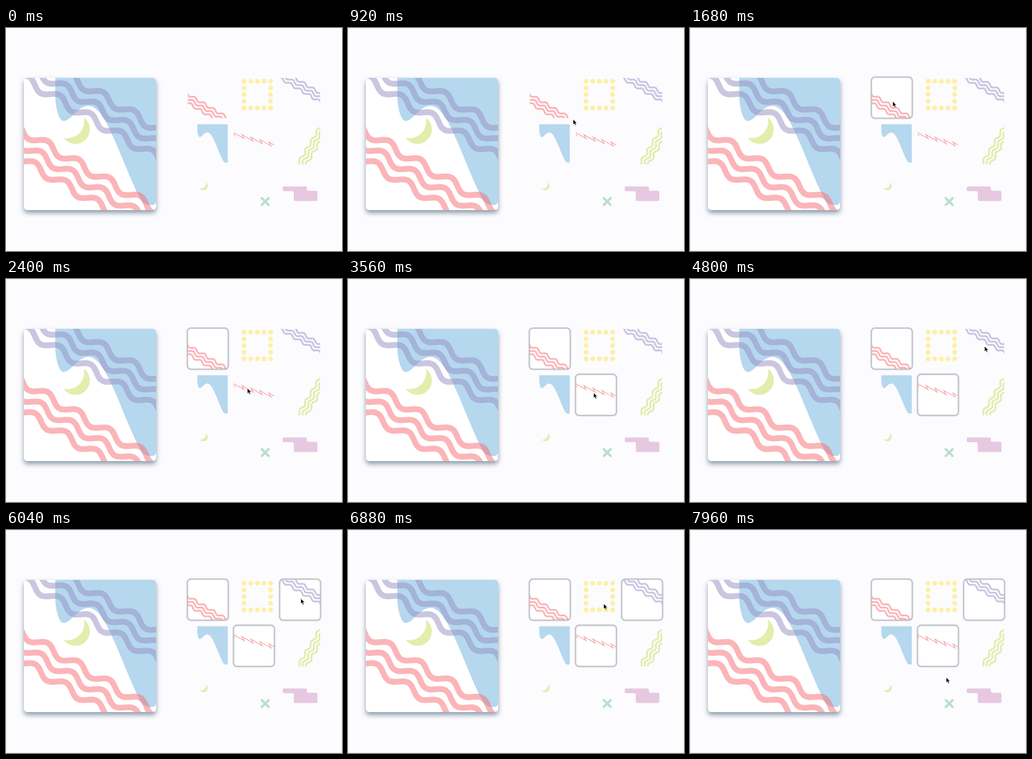
These frames come from a looping animation (600x398 px, 8000 ms). An HTML page:

```html
<!DOCTYPE html>
<html lang="en">
<head>
<meta charset="utf-8">
<title>Pattern picker</title>
<style>
html, body { margin: 0; width: 100%; height: 100%; overflow: hidden; background: #fcfbfe; }
svg { display: block; width: 100vw; height: 100vh; }
#card { filter: drop-shadow(0 5px 4.5px rgba(58, 92, 115, .6)); }
</style>
</head>
<body>
<svg id="stage" viewBox="0 0 600 398">
  <defs>
    <clipPath id="cardClip"><rect width="236" height="236" rx="6"/></clipPath>
    <clipPath id="tileClip"><rect width="236" height="236" rx="9"/></clipPath>
    <g id="coral" opacity=".5" fill="none" stroke="#f86d72" stroke-width="10.4"></g>
    <g id="violet" opacity=".5" fill="none" stroke="#958dc2" stroke-width="10.4"></g>
    <g id="lime" opacity=".5" fill="none" stroke="#c8de58" stroke-width="10.4"></g>
    <g id="dots" fill="#fdf0a3"></g>
    <path id="hill" fill="#b5d8ee" d="M56 0V31C56 51 62 77 71 77C84 77 96 50 115 50C134 50 148 79 165 118C181 156 196 194 208 216C213 225 220 227 227 227H228Q236 227 236 219V0Z"/>
    <polyline id="zigzag" fill="none" stroke="#f5a9ad" stroke-width="4.6"/>
    <path id="moon" fill="#e3edac" d="M107 71A25.8 25.8 0 1 1 71 107A30.1 30.1 0 0 0 107 71Z"/>
    <path id="cross" fill="none" stroke="#b9e0cb" stroke-width="14" stroke-linecap="round" d="M164 164L204 204M204 164L164 204"/>
    <path id="blocks" fill="#e6c9e0" d="M24 95H149Q158 95 158 104V113Q158 121 166 121H211Q220 121 220 130V172Q220 181 211 181H90Q81 181 81 172V132Q81 123 72 123H24Q16 123 16 115V103Q16 95 24 95Z"/>
  </defs>
  <rect width="600" height="398" fill="#fcfbfe"/>
  <rect id="edge" x=".5" y=".5" width="599" height="397" fill="none" stroke="#efeef1"/>
  <rect id="card" x="32" y="89" width="236" height="236" rx="6" fill="#fff"/>
  <g transform="translate(32 89)" clip-path="url(#cardClip)">
    <use href="#hill"/><use href="#moon"/><use href="#coral"/><use href="#violet"/>
  </g>
  <g id="tiles"></g>
  <path id="cursor" d="M0 0V9.6L2.2 7.5L3.9 11.1L5.6 10.3L4 6.9H6.9Z" fill="#000" stroke="#fff" stroke-width=".7" stroke-linejoin="round"/>
</svg>
<script>
const NS = 'http://www.w3.org/2000/svg';
const LOOP = 8000, PITCH = 82.4, SCALE = .304;
const $ = id => document.getElementById(id);

function add(parent, tag, attrs) {
  const el = document.createElementNS(NS, tag);
  for (const k in attrs) el.setAttribute(k, attrs[k]);
  return parent.appendChild(el);
}

// Three parallel sine bands; (x, y) is a crest of the first one.
function addWaves(id, x, y, angle) {
  const group = add($(id), 'g', { transform: `translate(${x} ${y}) rotate(${angle})` });
  const period = 64, amp = 7.3, gap = 22;
  for (let band = 0; band < 3; band++) {
    const pts = [];
    for (let s = -320; s <= 320; s += 2) {
      const n = band * gap + amp * (1 - Math.cos(s / period * 2 * Math.PI));
      pts.push(s + ',' + n.toFixed(2));
    }
    add(group, 'polyline', { points: pts.join(' ') });
  }
}

addWaves('coral', 43, 113, 30.6);
addWaves('violet', 142, 25.6, 30.6);
addWaves('lime', 182, 91, -59.2);

for (let i = 0; i < 5; i++)
  for (let j = 0; j < 5; j++)
    if (i % 4 === 0 || j % 4 === 0)
      add($('dots'), 'circle', { cx: 60 + 39 * i, cy: 20 + 39 * j, r: 14 });

const teeth = [];
for (let i = 0; i < 6; i++) {
  const x = -6 + 53 * i, y = 47 + 14.6 * i;
  teeth.push(`${x + 13},${y + 24}`, `${x},${y}`);
}
$('zigzag').setAttribute('points', teeth.join(' '));

const shapes = ['coral', 'dots', 'violet', 'hill', 'zigzag', 'lime', 'moon', 'cross', 'blocks'];
const frames = shapes.map((name, i) => {
  const x = 324.5 + PITCH * (i % 3), y = 89 + PITCH * Math.floor(i / 3);
  const frame = add($('tiles'), 'rect', {
    x: x - .7, y: y - 1.4, width: 73.2, height: 73.6, rx: 6.5,
    fill: '#fff', stroke: '#c4c7ce', 'stroke-width': 2.8
  });
  const tile = add($('tiles'), 'g', {
    transform: `translate(${x} ${y}) scale(${SCALE})`, 'clip-path': 'url(#tileClip)'
  });
  add(tile, 'use', { href: '#' + name });
  return frame;
});

// Tile index -> time of its click
const clicks = { 0: 1440, 4: 2960, 2: 5440 };

// Pointer stops: time, x, y
const stops = [
  [40, 500, 400], [920, 402, 163], [1340, 362, 130], [1720, 362, 131],
  [2400, 431, 195], [2760, 438, 202], [3560, 438.5, 203], [3760, 440, 203],
  [4800, 526, 120], [5160, 528, 122], [5960, 528, 122], [6880, 456.5, 131.5],
  [7640, 459, 138], [7960, 457.5, 263], [8000, 457.5, 264]
];

const clamp = v => Math.min(1, Math.max(0, v));
const ease = v => v * v * (3 - 2 * v);

function pointer(t) {
  let i = 0;
  while (i < stops.length - 2 && t >= stops[i + 1][0]) i++;
  const a = stops[i], b = stops[i + 1];
  const k = ease(clamp((t - a[0]) / (b[0] - a[0])));
  return [a[1] + (b[1] - a[1]) * k, a[2] + (b[2] - a[2]) * k];
}

function draw(t) {
  const [x, y] = pointer(t);
  const live = t >= 40 ? 'visible' : 'hidden';
  $('cursor').setAttribute('transform', `translate(${x} ${y})`);
  $('cursor').setAttribute('visibility', live);
  $('edge').setAttribute('visibility', live);
  frames.forEach((frame, i) => {
    frame.setAttribute('opacity', i in clicks ? clamp((t - clicks[i]) / 120) : 0);
  });
}

const start = performance.now();
function tick() {
  draw((performance.now() - start) % LOOP);
  requestAnimationFrame(tick);
}
draw(0);
requestAnimationFrame(tick);
</script>
</body>
</html>
```
